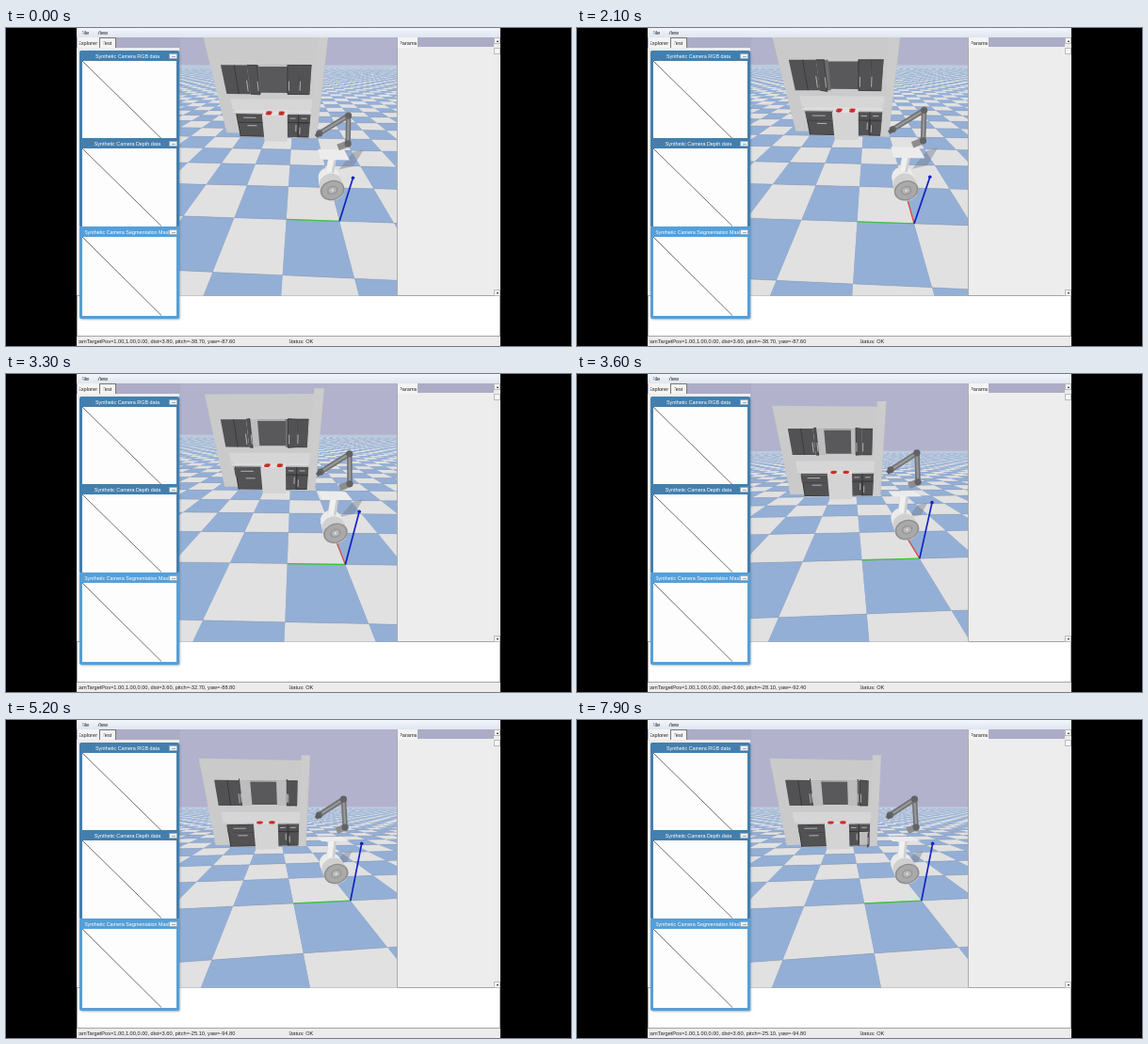
Write an HTML page with a canvas that moves like this. It is 600 px wide and 338 px high and loops after 8000 ms.

```html
<!DOCTYPE html>
<html lang="en">
<head>
<meta charset="utf-8">
<title>Robot kitchen simulation</title>
<style>
  html, body { margin: 0; width: 100%; height: 100%; overflow: hidden; background: #000; }
  #stage { position: relative; width: 600px; height: 338px; overflow: hidden; background: #000;
    font: 5.65px/8px "Liberation Sans", Arial, sans-serif; color: #222; }
  #stage > * { position: absolute; box-sizing: border-box; }
  .clip { white-space: pre; clip-path: inset(0 0 0 1.8px); }
  .app { left: 75px; top: 0; width: 450px; height: 338px; background: #fff; }
  .menu { left: 75px; top: 0; width: 450px; height: 10px; background: linear-gradient(#f3f6fb, #dfe5f0); }
  .strip { top: 10px; height: 11px; background: #acacc6; }
  .tab { top: 10px; height: 11px; background: #f4f4f4; }
  .panel { top: 21px; height: 264px; background: #ededed; }
  .log { left: 75px; top: 284px; width: 450px; height: 44px; background: #fff; border: 1px solid #a4a4a4; }
  .win { left: 78px; width: 106px; height: 95px; background: #437fae; border-radius: 2px; box-shadow: 1px 1px 2px #6788; }
  .win.on { height: 98px; background: #559fd8; }
  .win span { position: absolute; left: 4px; right: 8px; top: 2px; color: #fff; text-align: center;
    font-size: 5.4px; white-space: pre; }
  .win b { position: absolute; right: 2px; top: 3px; width: 9px; height: 6px; background: #eef4f8;
    border: .5px solid #9ab; box-sizing: border-box; border-radius: 1px; }
  .win b::after { content: ""; position: absolute; left: 2px; top: 2px; width: 4px; height: 1px; background: #9ab; }
  .win svg { position: absolute; left: 3px; top: 11px; background: #fdfdfd; }
  .win path { stroke: #333; stroke-width: .7; }
  .bar { left: 518px; top: 10px; width: 7px; height: 275px; background: #ececec; }
  .btn { left: 518px; width: 7px; height: 7px; background: #f7f7f7; border: .5px solid #bbb; }
  .btn::after { content: ""; position: absolute; left: 1.5px; top: 2px; border: 1.5px solid transparent; }
  .up::after { top: .5px; border-bottom: 2px solid #111; }
  .down::after { border-top: 2px solid #111; }
  .status { left: 75px; top: 328px; width: 450px; height: 10px; background: #ececec; }
</style>
</head>
<body>
<div id="stage">
  <div class="app"></div>
  <div class="menu"></div>
  <div class="log"></div>
  <canvas id="view" width="600" height="338" style="left:0;top:0"></canvas>
  <div class="strip" style="left:75px;width:110px"></div>
  <div class="panel" style="left:75px;width:109px;height:263px"></div>
  <div class="tab" style="left:76px;width:23px"></div>
  <div class="tab" style="left:99px;width:18px;border:1px solid #777;border-bottom:0"></div>
  <div class="strip" style="left:415px;width:103px"></div>
  <div class="panel" style="left:415px;top:20px;width:103px;border-left:1px solid #aaa"></div>
  <div class="tab" style="left:416px;width:21px"></div>
  <div class="bar"></div>
  <div class="btn up" style="top:10px"></div>
  <div class="btn" style="top:21px"></div>
  <div class="btn down" style="top:278px"></div>
  <div class="win" style="top:24px"><span class="clip">Synthetic Camera RGB data</span><b></b>
    <svg width="100" height="83"><path d="M0 0L84 82.5"/></svg></div>
  <div class="win" style="top:117px"><span class="clip">Synthetic Camera Depth data</span><b></b>
    <svg width="100" height="83"><path d="M0 0L84 82.5"/></svg></div>
  <div class="win on" style="top:211px"><span class="clip">Synthetic Camera Segmentation Mask</span><b></b>
    <svg width="100" height="84"><path d="M0 0L84 83.5"/></svg></div>
  <div class="status"></div>
  <div class="clip" style="left:79px;top:1px">File</div>
  <div class="clip" style="left:96px;top:1px">View</div>
  <div class="clip" style="left:76px;top:12px">Explorer</div>
  <div class="clip" style="left:102px;top:12px">Test</div>
  <div class="clip" style="left:417px;top:12px">Params</div>
  <div class="clip" id="info" style="left:75px;top:329px"></div>
  <div class="clip" style="left:299px;top:329px">Status: OK</div>
</div>
<script>
const LOOP = 8000, STEP = 100, FOCAL = 169, CX = 300, CY = 168.5, RAD = Math.PI / 180;
const DARK = '#525254', EDGE = '#303032', METAL = '#c9c9c9';
const ctx = document.getElementById('view').getContext('2d');
const info = document.getElementById('info');

// 0 before a, 1 after b, linear between.
const ramp = (t, a, b) => Math.min(1, Math.max(0, (t - a) / (b - a)));
const tenth = v => Math.round(v * 10) / 10;

// Zoom in, drag slowly, then drag faster.
function view(t) {
  const slow = ramp(t, 2480, 3300), fast = ramp(t, 3300, 3800);
  return {
    dist: tenth(3.8 - .2 * ramp(t, 1600, 1800)),
    pitch: tenth(38.7 - 6 * slow - 7.6 * fast),
    yaw: tenth(87.6 + 1.2 * ramp(t, 2700, 3300) + 6 * fast)
  };
}

let cam;
function setCamera({ dist, pitch, yaw }) {
  cam = {
    dist, sp: Math.sin(pitch * RAD), cp: Math.cos(pitch * RAD),
    sy: Math.sin(yaw * RAD), cy: Math.cos(yaw * RAD)
  };
}
// World point to screen; the camera looks at (1, 1, 0).
function proj(x, y, z = 0) {
  const dx = x - 1, dy = y - 1;
  const ahead = dx * cam.sy + dy * cam.cy, right = dx * cam.cy - dy * cam.sy;
  const k = FOCAL / (cam.dist + ahead * cam.cp - z * cam.sp);
  return [CX + right * k, CY - (ahead * cam.sp + z * cam.cp) * k];
}
function trace(pts, path = ctx) {
  pts.forEach(([x, y], i) => i ? path.lineTo(x, y) : path.moveTo(x, y));
}
function poly(fill, pts) {
  ctx.beginPath();
  trace(pts.map(p => proj(...p)));
  ctx.fillStyle = fill;
  ctx.fill();
}
function line(color, width, pts) {
  ctx.beginPath();
  trace(pts.map(p => proj(...p)));
  ctx.strokeStyle = color;
  ctx.lineWidth = width;
  ctx.stroke();
}
function oval(fill, [x, y], rx, ry = rx, turn = 0) {
  ctx.beginPath();
  ctx.ellipse(x, y, rx, ry, turn, 0, 7);
  ctx.fillStyle = fill;
  ctx.fill();
}
// Upright panel facing the camera, and a level one.
const front = (fill, x, y0, y1, z0, z1) =>
  poly(fill, [[x, y0, z0], [x, y1, z0], [x, y1, z1], [x, y0, z1]]);
const level = (fill, z, x0, x1, y0, y1) =>
  poly(fill, [[x0, y0, z], [x1, y0, z], [x1, y1, z], [x0, y1, z]]);

function floor() {
  ctx.fillStyle = '#b2b2cc';
  ctx.fillRect(184, 10, 232, 275);
  level('#bccade', 0, 12, 100, -110, 110);
  const tiles = [new Path2D(), new Path2D()];
  for (let x = -2; x < 60; x++) {
    const reach = Math.ceil(4 + (x + 2) * 1.3);
    for (let y = -reach; y <= reach; y++) {
      const path = tiles[Math.abs(x + y) % 2];
      trace([proj(x, y), proj(x + 1, y), proj(x + 1, y + 1), proj(x, y + 1)], path);
      path.closePath();
    }
  }
  ['#e1e1e1', '#94afd5'].forEach((color, i) => {
    ctx.fillStyle = color;
    ctx.fill(tiles[i]);
  });
  for (let i = -2; i < 9; i++) line('rgba(80,92,115,.35)', .5, [[i, -4 - i], [i, 6 + i]]);
}

// A leaf hinged at y = h, reaching to y = e when shut.
function door(h, e, z0, z1, angle) {
  const x = 4, w = e - h, a = angle * RAD;
  const ex = x - Math.abs(w) * Math.sin(a), ey = h + w * Math.cos(a);
  const leaf = [[x, h, z0], [ex, ey, z0], [ex, ey, z1], [x, h, z1]];
  front(angle > 50 ? '#bdbdbd' : '#6d6d6d', x, h, e, z0, z1);
  poly(DARK, leaf);
  line(EDGE, .7, leaf);
  const hx = x + (ex - x) * .88, hy = h + w * Math.cos(a) * .88;
  line(METAL, .8, [[hx, hy, z0 + .1], [hx, hy, z0 + .36]]);
}

function kitchen(t) {
  // Wall, backsplash and worktop
  front('#cacaca', 4.45, 3.7, .2, 0, 2.9);
  front('#d6d6d6', 4.44, 3.25, .25, .9, 1.25);
  level('#dcdcdc', .9, 3.95, 4.45, .33, 3.12);

  // Lower cabinets
  front('#c2c2c2', 3.97, 3.06, .33, .84, .9);
  front(EDGE, 4, 3, 2, .03, .85);
  const x = 4 - .15 * ramp(t, 1500, 3000);
  level('#9a9a9a', .82, x, 4, 2.05, 2.95);
  front(DARK, 4, 2.97, 2.03, .06, .55);
  front(DARK, x, 2.97, 2.03, .58, .83);
  line(METAL, .8, [[x, 2.75, .73], [x, 2.3, .73]]);
  line(METAL, .8, [[4, 2.65, .45], [4, 2.3, .45]]);
  front(DARK, 4, 1.18, .35, .03, .85);
  line(EDGE, .8, [[4, 1.18, .58], [4, .35, .58]]);
  line(EDGE, .8, [[4, .77, .03], [4, .77, .85]]);
  for (const y of [.97, .57]) line(METAL, .8, [[4, y + .1, .72], [4, y - .1, .72]]);
  line(METAL, .8, [[4, .85, .25], [4, .85, .5]]);
  door(.37, .75, .05, .56, 75 * ramp(t, 5200, 7900));

  // Stove
  front('#d4d4d4', 3.65, 2, 1.15, 0, .9);
  level('#e2e2e2', .9, 3.65, 4.1, 1.15, 2);
  for (const bx of [3.78, 3.98]) {
    for (const by of [1.8, 1.36]) {
      const p = proj(bx, by, .92);
      oval('#d8302a', p, 3.2, 1.3);
      oval('#8a3833', p, 1.2, .6);
    }
  }

  // Upper cabinets
  const low = 1.475, high = 2.237;
  level('#9c9c9c', high, 4, 4.4, .45, 3.15);
  front('#59595b', 4.03, 2.06, 1.14, 1.51, 2.2);
  front(DARK, 4, 3.18, 2.38, low, high);
  line(EDGE, .7, [[4, 2.77, low], [4, 2.77, high]]);
  line(METAL, .8, [[4, 2.45, 1.55], [4, 2.45, 1.85]]);
  door(2.38, 2.03, low, high, 18 + 62 * ramp(t, 1000, 4500));
  door(.44, .8, low, high, 30 * ramp(t, 5200, 7900));
  door(.8, 1.157, low, high, 85 * ramp(t, 2500, 4200));

  // Side column
  poly('#b6b6b6', [[4, .05, 0], [4.45, .05, 0], [4.45, .05, 2.95], [4, .05, 2.95]]);
  front('#cccccc', 4, .33, .05, 0, 2.95);
}

function robot() {
  // Ground shadow, base drum, wheel
  poly('rgba(115,125,142,.45)', [[1.8, -.35], [2.9, -1.05], [3.1, -1.45], [2, -.8]]);
  const drum = proj(.85, .14, .42), wheel = proj(.59, .075, .26);
  const [dx, dy] = [wheel[0] - drum[0], wheel[1] - drum[1]];
  for (let k = 0; k <= 1; k += .1) {
    const shade = k < .5 ? '#ebebeb' : '#d0d0d0';
    oval(shade, [drum[0] + dx * k, drum[1] + dy * k], 11 + 2 * k, 10 + k, -.3);
  }
  line('#cfcfcf', 9, [[.9, .12, .5], [.9, .12, .85]]);
  line('#f0f0f0', 6, [[.9, .14, .5], [.9, .14, .85]]);
  oval('#8e8e8e', wheel, 13, 10.5, -.3);
  oval('#a9a9a9', wheel, 11.5, 9.2, -.3);
  oval('#9a9a9a', wheel, 6, 4.8, -.3);
  oval('#b8b8b8', wheel, 4, 3, -.3);
  oval('#ececec', wheel, 1);

  // Plate and arm
  level('#ececed', .88, .75, 1.2, -.17, .38);
  const mount = [.95, .04, 1.04], foot = [1, -.15, 1.1], elbow = [1, -.04, 1.61], wrist = [.87, .443, 1.34];
  line('#8d8d8d', 7, [mount, foot]);
  line('#717173', 5.5, [foot, elbow, wrist]);
  line('#98989a', 2.2, [foot, elbow, wrist]);
  for (const joint of [foot, elbow, wrist]) oval('#636365', proj(...joint), 3.6);
  line('#5c5c5e', 4, [wrist, [.85, .5, 1.29]]);
}

function axes(t) {
  line('#3fc23f', 1.3, [[0, 0], [0, 1]]);
  line('#1222c4', 1.7, [[0, 0], [0, 0, 1]]);
  oval('#1222c4', proj(0, 0, 1), 1.8);
}

function draw(t) {
  const v = view(t);
  setCamera(v);
  ctx.clearRect(0, 0, 600, 338);
  ctx.save();
  ctx.beginPath();
  ctx.rect(184, 10, 232, 274.5);
  ctx.clip();
  ctx.lineJoin = 'round';
  floor();
  kitchen(t);
  if (t >= 1900 && t < 3700) line('#d84a42', 1.3, [[0, 0], [1, 0]]);
  robot();
  axes();
  ctx.restore();
  info.textContent = `camTargetPos=1.00,1.00,0.00, dist=${v.dist.toFixed(2)}, ` +
    `pitch=-${v.pitch.toFixed(2)}, yaw=-${v.yaw.toFixed(2)}`;
}

let shown = -1;
const start = performance.now();
function tick(now) {
  const t = Math.floor((Math.max(0, now - start) % LOOP) / STEP) * STEP;
  if (t !== shown) draw(shown = t);
  requestAnimationFrame(tick);
}
draw(0);
requestAnimationFrame(tick);
</script>
</body>
</html>
```
